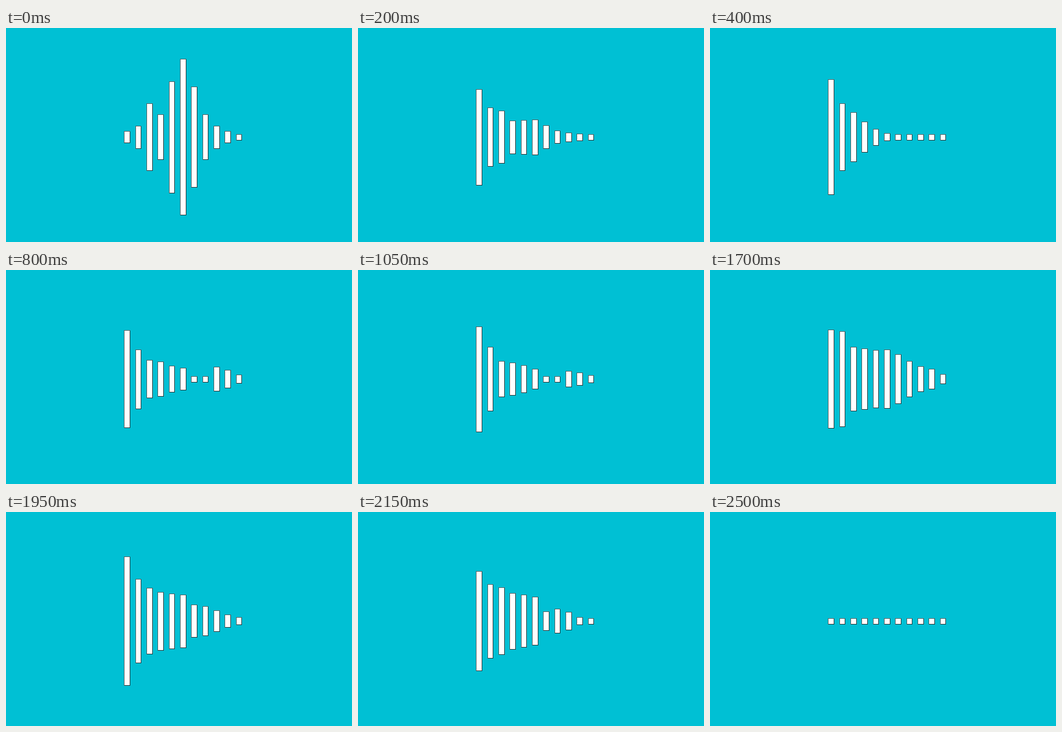
An HTML page with a canvas that plays this animation: 660x409 px, repeating every 2.55 s.

```html
<!DOCTYPE html>
<html lang="en">
<head>
<meta charset="utf-8">
<title>Equalizer</title>
<style>
  html, body { margin: 0; width: 100%; height: 100%; overflow: hidden; background: #00c0d4; }
  canvas { display: block; }
</style>
</head>
<body>
<canvas id="stage" width="660" height="409"></canvas>
<script>
const ctx = document.getElementById('stage').getContext('2d');
const LOOP = 2550, STEP = 50;
const UNIT = 10.66, LEFT = 225.8, PITCH = 64 / 3, MIDDLE = 208.6, BARS = 11;

const linear = p => p;
const easeIn = p => p * p;
const easeOut = p => 1 - (1 - p) ** 3;

// Bar heights in pixels; missing bars rest at one unit.
const poses = [
  { at: 50, ease: linear, heights: [2, 4, 12, 8, 20, 28, 18, 8, 4, 2, 1].map(n => n * UNIT) },
  { at: 400, ease: easeOut, heights: [220, 128, 93.5, 57.5, 31, 13.5] },
  { at: 800, ease: linear, heights: [186, 113, 72, 66, 50, 41.5, UNIT, UNIT, 46, 34.5, 16] },
  { at: 1350, ease: linear, heights: [188.5, 132, 61.5, 57, 55.5, 33.5] },
  { at: 1700, ease: linear, heights: [188.5, 182, 122, 116, 110, 112, 94, 67.5, 48, 37.5, 18] },
  { at: 2150, ease: linear, heights: [190, 141, 128, 107, 100.5, 91.5, 36, 46, 34, 14] },
  { at: 2250, ease: linear, heights: [216, 144, 125, 106, 98, 88, 44, 44, 34, 18, 14] },
  { at: 2500, ease: easeIn, heights: [] }
];

// Extra swells of the bass bar.
const swells = [
  { at: 600, size: 23 },
  { at: 1150, size: 28 },
  { at: 1950, size: 57 }
];
const SWELL_WIDTH = 200;

function swellAt(time) {
  return swells.reduce((sum, { at, size }) => {
    const p = Math.min(1, Math.abs(time - at) / SWELL_WIDTH);
    return sum + size * (1 + Math.cos(Math.PI * p)) / 2;
  }, 0);
}

function heightAt(bar, time) {
  const next = Math.max(1, poses.findIndex(pose => pose.at >= time));
  const from = poses[next - 1], to = poses[next];
  const p = Math.max(0, (time - from.at) / (to.at - from.at));
  const a = from.heights[bar] ?? UNIT, b = to.heights[bar] ?? UNIT;
  return a + (b - a) * to.ease(p) + (bar === 0 ? swellAt(time) : 0);
}

function fillBox(color, left, top, right, bottom) {
  ctx.fillStyle = color;
  ctx.fillRect(left, top, right - left, bottom - top);
}

// White bar on whole pixels, its hairline softer at the top and left.
function drawBar(x, height) {
  const left = Math.floor(x), right = Math.floor(x + UNIT) + 1;
  const top = Math.floor(MIDDLE - height / 2);
  const bottom = Math.floor(MIDDLE + height / 2 + 0.1) + 1;
  fillBox('#555', left, top, right, bottom);
  fillBox('#222', left + 1, top + 1, right, bottom);
  fillBox('#fff', left + 1, top + 1, right - 1, bottom - 1);
}

function draw(time) {
  fillBox('#00c0d4', 0, 0, 660, 409);
  for (let bar = 0; bar < BARS; bar++) {
    drawBar(LEFT + bar * PITCH, heightAt(bar, time));
  }
}

const start = performance.now();
function tick() {
  const time = (performance.now() - start) % LOOP;
  draw(Math.floor(time / STEP) * STEP);
  requestAnimationFrame(tick);
}
tick();
</script>
</body>
</html>
```
